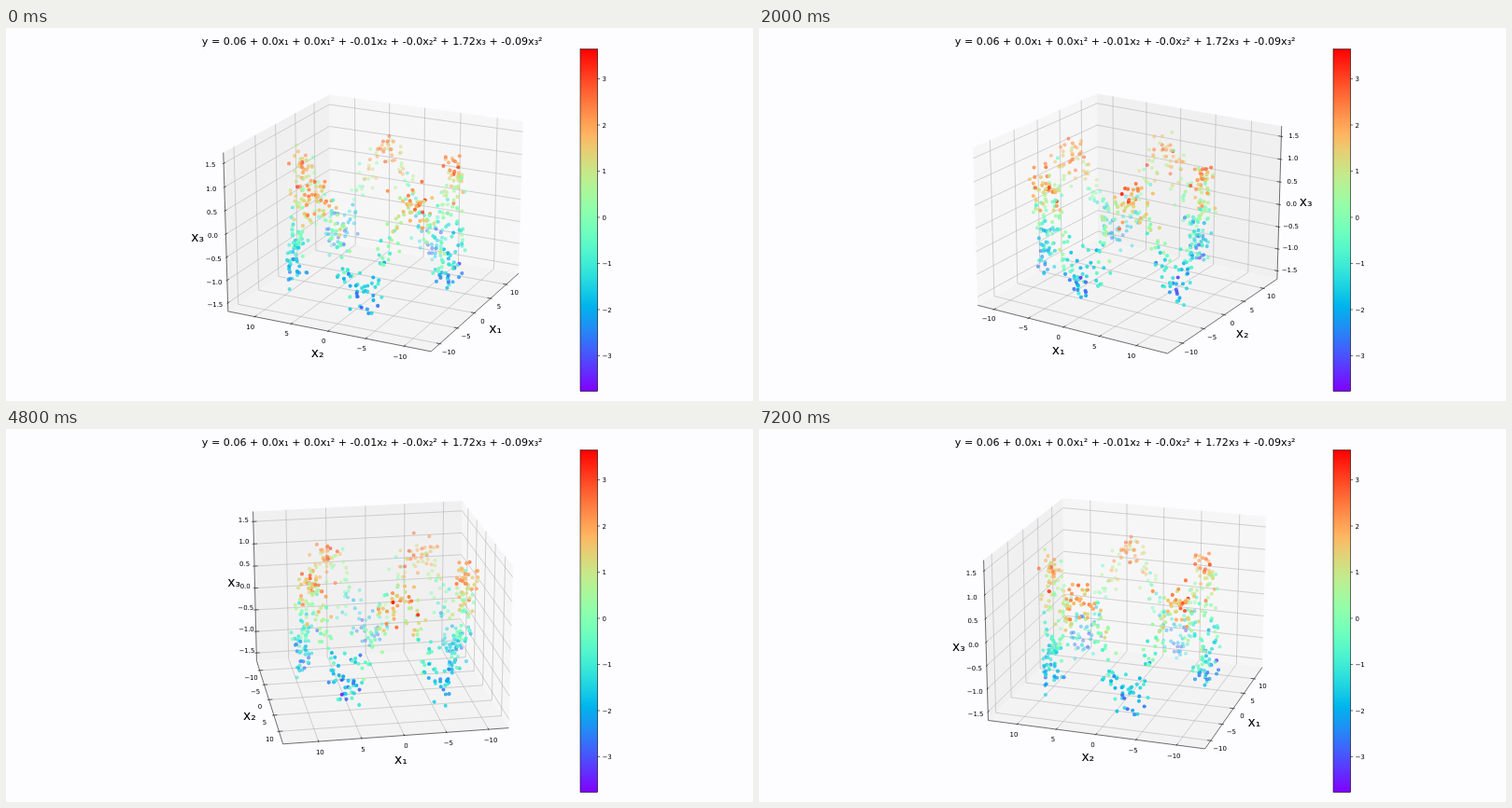
These frames come from a looping animation (800x400 px, 7.3 s). An HTML page with a canvas:

```html
<!DOCTYPE html>
<html lang="en">
<head>
<meta charset="utf-8">
<title>Rotating 3D scatter</title>
<style>
  html, body { margin: 0; width: 100%; height: 100%; overflow: hidden; background: #fdfcfe; }
  canvas { display: block; }
</style>
</head>
<body>
<canvas id="stage" width="800" height="400"></canvas>
<script>
const ctx = document.getElementById('stage').getContext('2d');
const RAD = Math.PI / 180, FONT = '"DejaVu Sans", sans-serif';
const STEP_MS = 100, STEPS = 73;

// Camera and box: half extents in scene units, camera distance 10
const CX = 397.4, CY = 201, SCALE = 1984, DIST = 10;
const SIDE = 0.5952, HEIGHT = 0.4464;
const SIN_E = Math.sin(20 * RAD), COS_E = Math.cos(20 * RAD);
const HAIR = 0.56;

const axes = [
  { label: 'x₁', mid: 0.85, half: 13.26, ticks: [-10, -5, 0, 5, 10], digits: 0 },
  { label: 'x₂', mid: 0.15, half: 13.6, ticks: [-10, -5, 0, 5, 10], digits: 0 },
  { label: 'x₃', mid: 0.02, half: 1.705, ticks: [-1.5, -1, -0.5, 0, 0.5, 1, 1.5], digits: 1 }
];
const unit = (value, axis) => (value - axes[axis].mid) / axes[axis].half;
const format = (value, digits) => value.toFixed(digits).replace('-', '−');
const clamp = (v, lo, hi) => Math.min(hi, Math.max(lo, v));

// Colour scale
const Y_MIN = -3.77, Y_MAX = 3.645, BAR = { x: 615, y: 22.6, w: 18.6, h: 367 };
function rainbow(p, alpha = 1) {
  const rgb = [Math.abs(2 * p - 0.5), Math.sin(Math.PI * p), Math.cos(Math.PI * p / 2)]
    .map(c => Math.round(255 * clamp(c, 0, 1)));
  return `rgba(${rgb},${alpha})`;
}

// Noisy ring with five waves
let seed = 20;
function random() {
  seed = (seed + 0x6D2B79F5) | 0;
  let t = Math.imul(seed ^ (seed >>> 15), 1 | seed);
  t = (t + Math.imul(t ^ (t >>> 7), 61 | t)) ^ t;
  return ((t ^ (t >>> 14)) >>> 0) / 4294967296;
}
const gauss = sd => sd * Math.sqrt(-2 * Math.log(1 - random())) * Math.cos(2 * Math.PI * random());

const COUNT = 580;
const points = Array.from({ length: COUNT }, (_, i) => {
  const angle = 2 * Math.PI * (i + random()) / COUNT, wave = Math.sin(5 * angle);
  const y = clamp(2 * wave + gauss(0.65), Y_MIN, Y_MAX);
  return {
    pos: [
      unit(10 * Math.cos(angle) + gauss(0.6), 0),
      unit(10 * Math.sin(angle) + gauss(0.6), 1),
      unit(clamp(wave + gauss(0.2), -1.47, 1.5), 2)
    ],
    level: (y - Y_MIN) / (Y_MAX - Y_MIN)
  };
});

let cosA = 1, sinA = 0;
function project([u, v, w]) {
  const x = SIDE * (v * cosA - u * sinA);
  const toward = SIDE * (u * cosA + v * sinA);
  const z = HEIGHT * w;
  const depth = DIST - toward * COS_E - z * SIN_E;
  return [
    CX + SCALE * x / depth,
    CY - SCALE * (z * COS_E - toward * SIN_E) / depth,
    depth
  ];
}

function path(corners) {
  ctx.beginPath();
  corners.forEach(c => ctx.lineTo(...project(c).slice(0, 2)));
}
function line(corners, color) {
  path(corners);
  ctx.strokeStyle = color;
  ctx.lineWidth = HAIR;
  ctx.stroke();
}
function pane(corners, color) {
  path(corners);
  ctx.closePath();
  ctx.fillStyle = color;
  ctx.fill();
}
function text(str, x, y, size, align = 'center') {
  ctx.font = `${size}px ${FONT}`;
  ctx.textAlign = align;
  ctx.fillStyle = '#000';
  ctx.fillText(str, x, y + 0.365 * size);
}

function drawBox() {
  const su = cosA < 0 ? -1 : 1, sv = sinA < 0 ? -1 : 1;
  pane([[-su, -1, -1], [-su, 1, -1], [-su, 1, 1], [-su, -1, 1]], 'rgba(242,242,242,.5)');
  pane([[-1, -sv, -1], [1, -sv, -1], [1, -sv, 1], [-1, -sv, 1]], 'rgba(230,230,230,.5)');
  pane([[-1, -1, -1], [1, -1, -1], [1, 1, -1], [-1, 1, -1]], 'rgba(236,236,236,.5)');

  const grids = [
    p => [[p, sv, -1], [p, -sv, -1], [p, -sv, 1]],
    p => [[su, p, -1], [-su, p, -1], [-su, p, 1]],
    p => [[su, -sv, p], [-su, -sv, p], [-su, sv, p]]
  ];
  axes.forEach((axis, i) =>
    axis.ticks.forEach(t => line(grids[i](unit(t, i)), '#b0b0b0')));

  // Edge carrying each axis, and the direction of its tick marks
  const edges = [[0, sv, -1], [su, 0, -1], [su, -sv, 0]], tickDir = [1, 0, 0];
  axes.forEach((axis, i) => {
    const at = (p, grow = 0, only = -1) => edges[i].map((c, k) =>
      k === i ? p : only < 0 || only === k ? c * (1 + grow) : c);
    line([at(-1), at(1)], '#000');
    axis.ticks.forEach(t => {
      const p = unit(t, i);
      line([at(p, 0.016, tickDir[i]), at(p, -0.032, tickDir[i])], '#000');
      const [x, y] = project(at(p, 0.0835));
      text(format(t, axis.digits), x, y, 6.94);
    });
    const [x, y] = project(at(0, 0.181));
    text(axis.label, x, y, 13.9);
  });
}

function drawPoints() {
  const dots = points.map(p => {
    const [x, y, depth] = project(p.pos);
    return { x, y, depth, level: p.level };
  }).sort((a, b) => b.depth - a.depth);
  const far = dots[0].depth, near = dots[COUNT - 1].depth;
  ctx.lineWidth = 1.04;
  for (const d of dots) {
    const alpha = 1 - 0.7 * (d.depth - near) / (far - near);
    ctx.fillStyle = ctx.strokeStyle = rainbow(d.level, alpha);
    ctx.beginPath();
    ctx.arc(d.x, d.y, 1.55, 0, 2 * Math.PI);
    ctx.fill();
    ctx.stroke();
  }
}

const barFill = ctx.createLinearGradient(0, BAR.y + BAR.h, 0, BAR.y);
for (let i = 0; i <= 64; i++) barFill.addColorStop(i / 64, rainbow(i / 64));

function drawColorBar() {
  ctx.fillStyle = barFill;
  ctx.fillRect(BAR.x, BAR.y, BAR.w, BAR.h);
  ctx.strokeStyle = '#000';
  ctx.lineWidth = HAIR;
  ctx.strokeRect(BAR.x, BAR.y, BAR.w, BAR.h);
  const right = BAR.x + BAR.w;
  for (let v = -3; v <= 3; v++) {
    const y = BAR.y + BAR.h * (Y_MAX - v) / (Y_MAX - Y_MIN);
    ctx.beginPath();
    ctx.moveTo(right, y);
    ctx.lineTo(right + 2.4, y);
    ctx.stroke();
    text(format(v, 0), right + 4.9, y, 6.94, 'left');
  }
}

function frame(now) {
  const step = Math.floor(now / STEP_MS) % STEPS;
  const azimuth = (206 + 2 * Math.floor(step * 22 / 9)) * RAD;
  cosA = Math.cos(azimuth);
  sinA = Math.sin(azimuth);
  ctx.fillStyle = '#fdfcfe';
  ctx.fillRect(0, 0, 800, 400);
  drawBox();
  drawPoints();
  drawColorBar();
  text('y = 0.06 + 0.0x₁ + 0.0x₁² + -0.01x₂ + -0.0x₂² + 1.72x₃ + -0.09x₃²', 392.2, 14, 11.11);
  requestAnimationFrame(frame);
}

const start = performance.now();
requestAnimationFrame(function first() { frame(0); });
const tick = frame;
frame = now => tick(Math.max(0, now - start));
</script>
</body>
</html>
```
